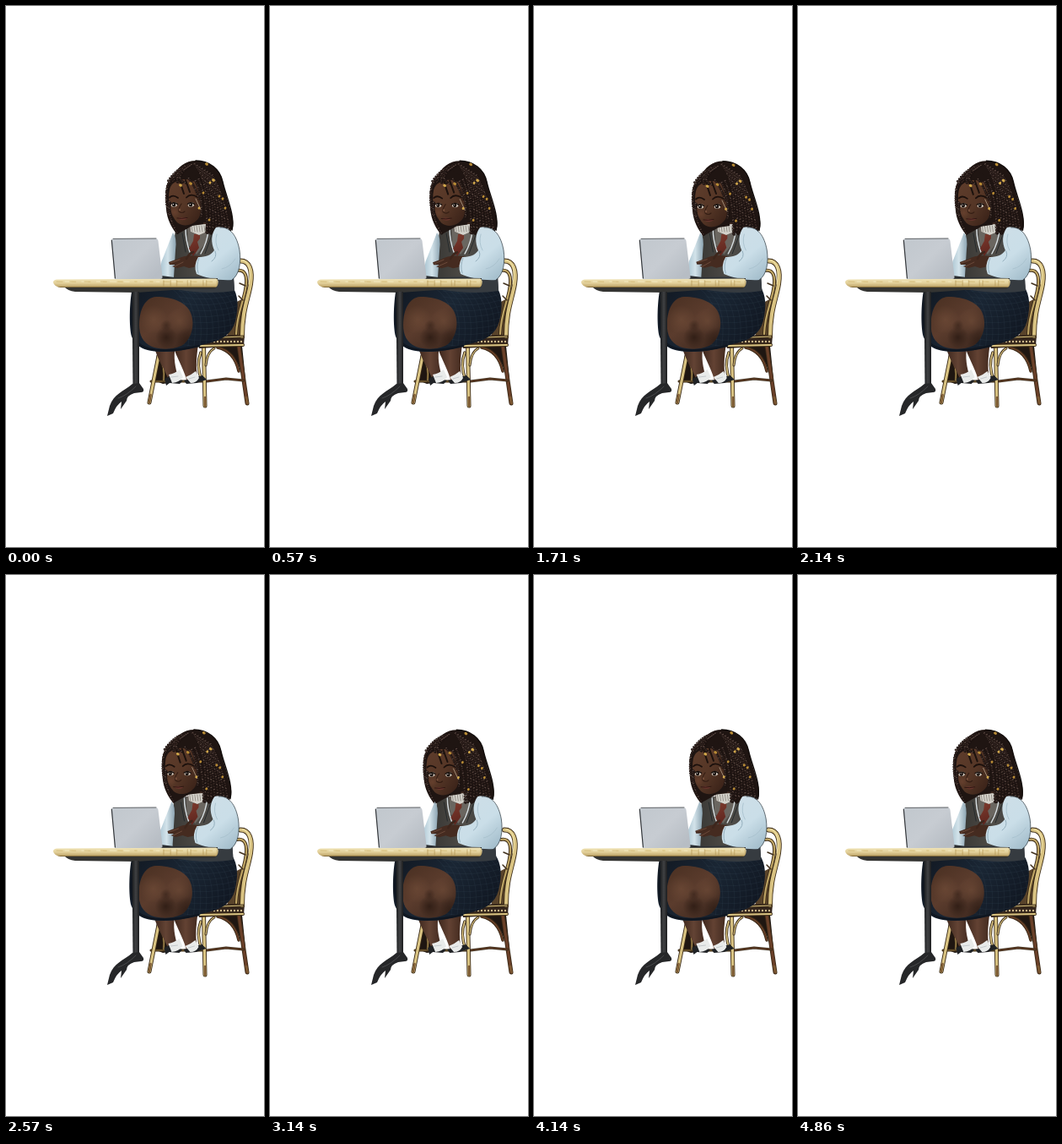
An HTML page with a canvas for the animation above (5000 ms loop, 306 by 640 pixels).

```html
<!DOCTYPE html>
<html lang="en">
<head>
<meta charset="utf-8">
<title>Typing at a cafe table</title>
<style>
html, body { margin: 0; width: 100%; height: 100%; overflow: hidden; background: #fff; }
canvas { display: block; }
</style>
</head>
<body>
<canvas width="306" height="640"></canvas>
<script>
const g = document.querySelector('canvas').getContext('2d');
const LOOP = 5000, FRAMES = 35, STEP = LOOP / FRAMES;

function fill(d, color) {
  g.fillStyle = color;
  g.fill(new Path2D(d));
}

function line(d, color, width = 1) {
  g.strokeStyle = color;
  g.lineWidth = width;
  g.lineCap = g.lineJoin = 'round';
  g.stroke(new Path2D(d));
}

function oval(x, y, rx, ry, color, turn = 0) {
  g.fillStyle = color;
  g.beginPath();
  g.ellipse(x, y, rx, ry, turn, 0, 7);
  g.fill();
}

function blend(x0, y0, x1, y1, ...colors) {
  const b = g.createLinearGradient(x0, y0, x1, y1);
  colors.forEach((c, i) => b.addColorStop(i / (colors.length - 1), c));
  return b;
}

function glow(x, y, r, rgb, alpha) {
  const b = g.createRadialGradient(x, y, 0, x, y, r);
  b.addColorStop(0, `rgba(${rgb},${alpha})`);
  b.addColorStop(1, `rgba(${rgb},0)`);
  oval(x, y, r, r, b);
}

function shifted(x, y, draw) {
  g.save();
  g.translate(x, y);
  draw();
  g.restore();
}

function clipped(d, draw) {
  g.save();
  g.clip(new Path2D(d));
  draw();
  g.restore();
}

// Cane is a thick stroke with a dark rim and a light core
function cane(d, color, width = 4) {
  line(d, '#3a2a17', width + 1);
  line(d, color, width - .8);
}

// Overlapping beads of hair along a quadratic curve
function braid(x0, y0, cx, cy, x1, y1, size = 2) {
  const n = Math.ceil(Math.hypot(x1 - x0, y1 - y0) / 2.8);
  for (let i = 0; i <= n; i++) {
    const t = i / n, u = 1 - t;
    const x = u * u * x0 + 2 * u * t * cx + t * t * x1;
    const y = u * u * y0 + 2 * u * t * cy + t * t * y1;
    oval(x, y, size, 1.5, '#1c1311', .6);
    oval(x - .4, y - .3, size * .65, .7, i % 3 ? '#3a2a25' : '#594740', i % 2 ? .7 : -.5);
  }
}

// Lean of the head in pixels: [time, x, y]
const LEAN = [[0, 0, 0], [570, .2, .6], [1710, -2.3, 2], [2570, -4.3, -.3],
  [3140, -7.5, 1], [4140, -5, -.2], [LOOP, -5.4, .5]];

// Smooth curve through the lean points, without a stop at each
function lean(t) {
  const i = LEAN.findIndex(k => k[0] > t), last = LEAN.length - 1;
  const a = LEAN[i - 1], b = LEAN[i];
  const before = LEAN[Math.max(i - 2, 0)], after = LEAN[Math.min(i + 1, last)];
  const span = b[0] - a[0], p = (t - a[0]) / span, p2 = p * p, p3 = p2 * p;
  return [1, 2].map(c => {
    const from = (b[c] - before[c]) / (b[0] - before[0]) * span;
    const to = (after[c] - a[c]) / (after[0] - a[0]) * span;
    return a[c] * (2 * p3 - 3 * p2 + 1) + from * (p3 - 2 * p2 + p) +
      b[c] * (3 * p2 - 2 * p3) + to * (p3 - p2);
  });
}

function chair() {
  const pale = '#d9c382', brown = '#6a4029', dark = '#1f1611';
  fill('M179 411L190 424L193 446L186 447L176 443Z', dark);
  fill('M250 402L280 402L284 441L278 433C275 418 266 408 250 402Z', dark);
  fill('M270 352L283 345L281 392L262 392Z', '#59432a');
  cane('M276 402L286 470', brown, 4);
  cane('M238 444L261 441L282 443', brown, 2);
  cane('M251 404C265 407 273 418 276 432', brown, 2.5);
  cane('M172 444L236 444', '#8d733d', 2);
  cane('M181 414L170 469', pale, 4);
  cane('M231 410C227 420 228 432 232 443', pale, 2.5);
  cane('M234.5 402L236 473', pale, 4);
  cane('M247 405C241 408 238 415 237 425', pale, 2);
  cane('M182 416C187 424 188 433 187 443', '#b99d5a', 2);
  line('M171.5 460L170 469M236 463L236.2 473M285 463L286.5 470', '#7d5a33', 2.5);
  fill('M228 390L283 389L282 402L229 405Z', '#33251c');
  cane('M274 313C284 311 287 320 284 335C282 349 274 364 273 388', '#bda363', 3);
  cane('M278 301.5C289 301.5 292.5 313 290 329C287 347 280 360 280 391', pale, 5);
  line('M280 301C289 302 291 314 288 329', '#f0e2a8', 1.2);
  line('M277 328L284 331M276 343L281 348', '#40301d', 1.5);
  cane('M229 393L281 391', pale, 2);
  cane('M230 402L281 401', pale, 3);
  for (let x = 231; x < 282; x += 4) oval(x, 397, 1.2, 1.3, '#cdb98a');
}

const SKIRT = 'M150 333C146 352 146 380 149 391C154 404 166 409 187 409C211 409 224 403 236 400' +
  'C256 396 268 388 272 373C276 357 276 342 268 331Z';

function legs() {
  fill('M175 402L201 402C198 416 201 428 204 439L193 442C188 430 180 418 175 402Z',
    blend(176, 0, 204, 0, '#3d271d', '#634334', '#422a20'));
  fill('M198 401L228 400C226 415 225 427 227 438L214 442C210 427 202 416 198 401Z',
    blend(199, 0, 228, 0, '#3b251b', '#634233', '#422a1f'));
  fill('M188 441L194 438L203 442L210 443L206 447L194 446L190 449Z', '#202225');
  fill('M211 443L219 441L233 437L238 442L226 446L214 447Z', '#202225');
  fill('M193 436Q200 435 206 430L210 439Q206 445 197 446Z', '#e9ebea');
  fill('M213 439Q219 437 225 432L229 440Q226 446 219 446Z', '#e9ebea');
  line('M196 439L204 438M217 441L224 439', '#b9bfc3', .8);

  fill(SKIRT, blend(150, 338, 250, 405, '#121923', '#1a2634', '#111823'));
  clipped(SKIRT, () => {
    for (let i = 0; i < 10; i++) {
      const x = 214 + i * 7;
      line(`M${x - 18} 334Q${x + 9} 352 ${x + 2} 402`, '#44566530', .8);
      line(`M205 ${337 + i * 7}Q240 ${344 + i * 7} 278 ${333 + i * 7}`, '#44566530', .8);
    }
  });
  const skin = 'M158 377C158 359 165 345 178 344C198 344 214 351 219 363C225 378 219 393 211 400' +
    'C201 407 184 407 173 403C162 398 158 389 158 377Z';
  fill(skin, blend(160, 345, 205, 407, '#4a3022', '#5b3c2d', '#402a20'));
  clipped(skin, () => {
    glow(175, 371, 17, '128,88,64', .4);
    glow(206, 373, 16, '128,88,64', .42);
    glow(190, 392, 13, '30,17,11', .6);
    glow(190, 378, 7, '30,17,11', .35);
    glow(216, 396, 16, '30,17,11', .45);
  });
  line('M151 350C148 371 149 390 158 400C171 411 204 408 229 402', '#0f1620', 2.5);
}

const VEST = 'M201 264L217 262L242 262L254 270L270 322L271 336L200 336L197 300Z';

function torso() {
  fill(VEST, blend(198, 0, 270, 0, '#3a3936', '#504d48', '#393c3f'));
  fill('M200 321L270 319L271 337Q240 342 200 335Z', '#363b40');
  fill('M215 262L241 262L237 280L226 294L216 282Z', '#6a6660');
  line('M213 264Q213 277 218 291M240 265Q239 279 231 293', '#d5dcdf', 1.5);
  line('M209 269L213 291M244 271L236 293', '#252a2c', 1);
  fill('M223 270L230 269L230 275L227 279L229 286L222 296L217 287L222 278Z',
    blend(219, 270, 230, 293, '#7c3a2d', '#5d251e'));
}

function collar() {
  fill('M217 257L237 256L236 268L229 271L219 267Z', '#3d2920');
  fill('M218 259L237 258L236 268L229 271L219 267Z', '#d4d2cb');
  for (let x = 220; x < 237; x += 3) line(`M${x} 260L${x + 1} 267`, '#8e8982', .9);
}

function arms(frame) {
  const left = 'M198 268Q203 274 201 289L199 321L185 322Q181 307 187 296Z';
  fill(left, blend(183, 0, 201, 0, '#abc5d2', '#d3e3ea', '#91a8b5'));
  const tap = Math.sin(frame * 2.1) * .7;
  shifted(0, tap * .4, () => {
    fill('M230 296C218 294 209 296 204 299L193 303L194 306L202 306L197 308L203 310L211 308' +
      'L217 310Q224 309 230 306Z', '#452b20');
    line(`M206 300L195 ${304 + tap}M210 303L200 ${308 - tap}`, '#6b4a3a', 1);
    line('M214 299Q217 293 222 291', '#3d261c', 2.5);
  });
  const sleeve = 'M249 262C264 259 274 271 277 289C279 303 277 318 268 324C254 325 237 322 226 317' +
    'Q222 307 228 297C237 297 243 295 247 289C243 280 243 270 249 262Z';
  fill(sleeve, blend(236, 270, 276, 318, '#cddee7', '#cadee8', '#a3bdcb'));
  line('M248 290Q251 297 244 302M229 298Q225 307 228 316', '#94afbd', 1);
  line('M256 311Q266 309 272 299M250 270Q247 280 252 289', '#a9c1cd', .9);
  line('M254 262C266 261 274 272 277 289C279 303 277 318 268 324', '#3b4850', .8);
}

function backHair() {
  const d = 'M198 203C203 190 213 183 225 183C240 183 254 193 257 207C260 221 263 230 266 240' +
    'C269 250 271 259 268 265L260 262L250 266L243 271L230 258L224 214Z';
  fill(d, '#1f1512');
  for (let i = 0; i < 8; i++) {
    braid(224 + i * 3, 187 + i * 1.9, 243 + i * 2.4, 211 + i * 2, 238 + i * 3.9, 268 - (i % 3) * 3);
  }
  line('M225 183C241 183 254 193 257 208C261 226 272 247 268 265', '#110c0a', 1.4);
}

function eye(x, y, look) {
  oval(x, y, 3.8, 2.6, '#d2c8bc', -.1);
  oval(x + look, y + .2, 2.1, 2.4, '#1b1310');
  oval(x + look - .6, y - .6, .6, .6, '#eee');
  line(`M${x - 4} ${y - .8}Q${x} ${y - 3.8} ${x + 4} ${y - .5}`, '#140d0a', 1.4);
}

function face() {
  fill('M190 221C190 205 201 193 214 192L233 206L234 258L221 260L203 270C196 262 191 252 190 240Z', '#1f1512');
  fill('M194 217C197 205 214 201 227 210C235 222 234 240 229 250C223 260 210 262 203 256' +
    'C195 248 191 231 194 217Z', blend(193, 220, 233, 246, '#5c3b2a', '#553626', '#3b2319'));
  glow(200, 244, 6, '130,80,58', .35);
  line('M194 226.5Q198 222.5 204 227M214 226.5Q219 221 227 226', '#1b100c', 1.8);
  eye(199.5, 235, -.4);
  eye(219.5, 235, -.5);
  line('M208 234Q204 240 205 243Q209 246 212 243', '#331d14', 1.1);
  oval(206, 241, 1, 1.5, '#78513d');
  fill('M203 251Q208 249 215 251Q210 255.5 203 251Z', '#67352d');
  line('M203 251Q208 252 215 250.5', '#2e1712', 1);
  for (let i = 0; i < 5; i++) {
    braid(220 - i * 2, 188 + i * 1.4, 205 - i, 190 + i * 4, 193 + i * 5, 207 + i * .5, 2.2);
  }
  braid(192, 213, 188, 233, 195, 251, 2);
  braid(194, 232, 192, 249, 203, 268, 2);
  braid(199, 203, 192, 207, 191, 220, 2);
  line('M206 207L211 222M213 206L218 220', '#1c120e', 2);
  braid(217, 204, 224, 213, 229, 228, 1.5);
  braid(225, 207, 234, 228, 232, 249, 2);
  braid(229, 205, 239, 228, 239, 268, 2);
  line('M225 228L231 241', '#b6a28b', .8);
}

function beads() {
  const spots = [[207, 212], [219, 210], [238, 187], [246, 206], [253, 225], [260, 239],
    [242, 209], [241, 253], [257, 228], [229, 239], [234, 221]];
  spots.forEach(([x, y], i) => oval(x, y, i < 4 ? 2 : 1.4, 1.6, i % 3 ? '#b88b35' : '#d2a84b', .5));
}

function laptop() {
  fill('M184 319L200 321L251 322L251 324L130 325Z', '#292c30');
  const lid = 'M127 275.5L177 275Q180 275 180.5 278L185.5 320Q186 323 183 323L131 324Q129 324 129 321L125 278Q125 276 127 275.5Z';
  fill(lid, blend(132, 278, 174, 322, '#c2c8ce', '#c7ccd2', '#b7bdc4'));
  line('M125.3 277L129.4 322', '#33363a', 1.2);
  line('M127 275.4L178 275', '#4c5054', .9);
}

function table() {
  fill('M69 332L251 332L247 335L211 335L155 339L82 338Q73 337 69 332Z', '#343432');
  fill('M149.5 338L158 338L158 452L150.5 452Z', blend(150, 0, 158, 0, '#1e2022', '#404143', '#1c1d1f'));
  fill('M150 447L158 446L163 453Q164 457 160 457L152 458Q143 461 143 467L136 477L137 468' +
    'Q131 472 127 482L120 485L123 473C128 459 139 456 150 447Z', '#262729');
  line('M154 450Q143 461 133 464', '#48494b', 1);
  const top = 'M60 323.5L249 322.5Q252 323 251.5 328Q251 333 247 333L65 333Q57 332 56 327Q56 324 60 323.5Z';
  fill(top, blend(0, 323, 0, 333, '#efe3b6', '#e2cf98', '#b69b5e'));
  clipped(top, () => {
    for (let i = 0; i < 22; i++) {
      const x = 60 + i * 9 + Math.sin(i * 9) * 3;
      line(`M${x} 326L${x + 7} 326.2`, i % 2 ? '#f3e9c0' : '#d5bd7b', 1);
      if (x > 175) line(`M${x} 325L${x} 331`, '#ad8f4e70', 1.5);
    }
    line('M57 332.6L250 332.6', '#7d6638', 1);
  });
}

function draw(now) {
  const frame = Math.floor((now + 3) / STEP) % FRAMES;
  const [x, y] = lean(frame * STEP);
  g.fillStyle = '#fff';
  g.fillRect(0, 0, 306, 640);
  chair();
  shifted(x * .12, 0, legs);
  shifted(x * .35, 0, torso);
  shifted(x * .5, y * .3, backHair);
  shifted(x * .5, 0, collar);
  shifted(x, y, face);
  shifted(x * .35, 0, () => arms(frame));
  shifted(x * .75, y * .6, beads);
  laptop();
  table();
}

const start = performance.now();
function animate() {
  draw(performance.now() - start);
  requestAnimationFrame(animate);
}
animate();
</script>
</body>
</html>
```
